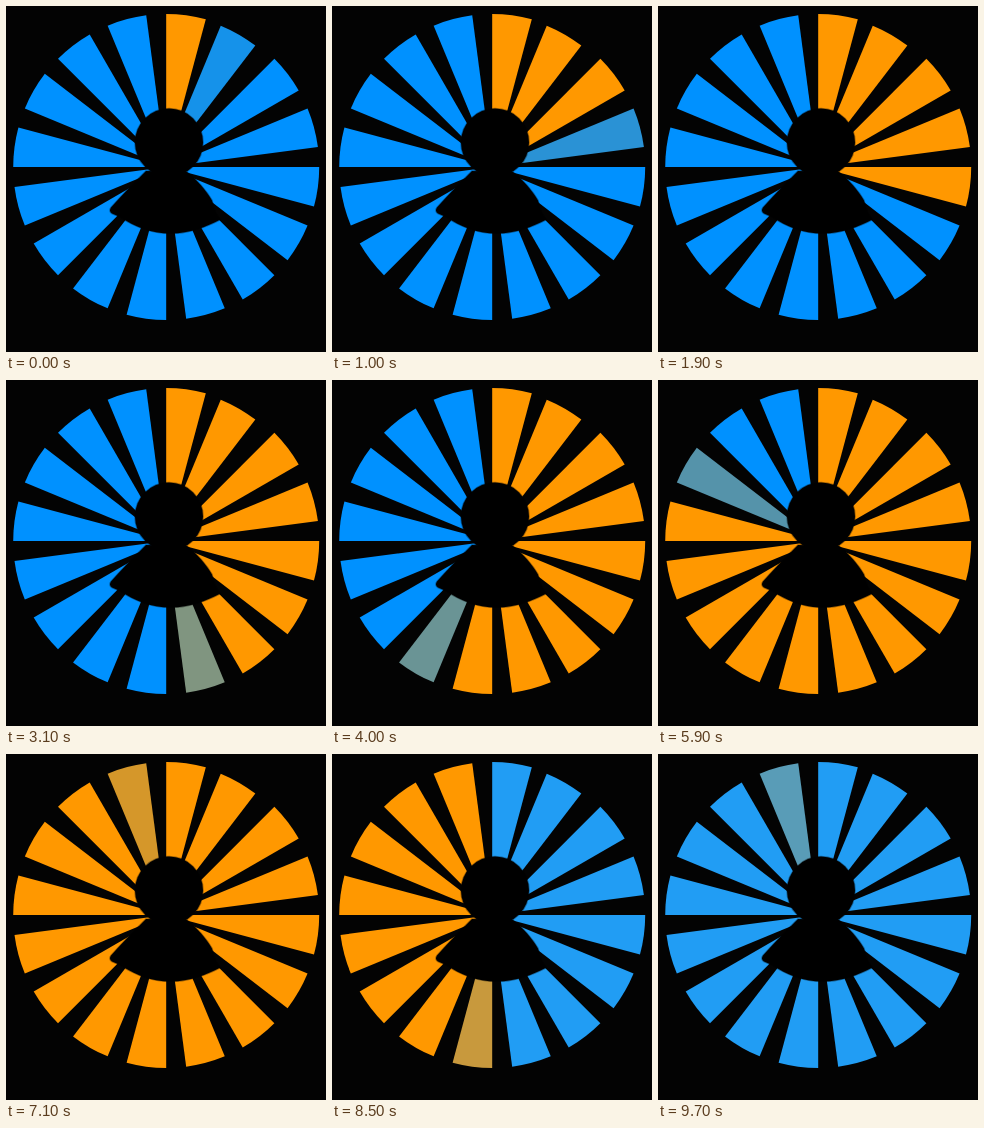
Recreate the animation shown at these times as an HTML page. Size 320 by 346 pixels, loop 9800 ms.

```html
<!DOCTYPE html>
<html lang="en">
<head>
<meta charset="utf-8">
<title>Radial countdown</title>
<style>
html, body { margin: 0; width: 100%; height: 100%; overflow: hidden; background: #030303; }
svg { display: block; width: 100vw; height: 100vh; }
</style>
</head>
<body>
<svg viewBox="0 0 320 346">
  <g id="rays"></g>
  <g stroke="#000" stroke-opacity=".35" stroke-width="1.6">
    <circle cx="163" cy="136.5" r="34"/>
    <path d="M140 165 C131 174 120 185 105 201.5 Q102.5 205 106 207.5 L114 211 C128 220 144 227.500 165 227.500 C184 227.500 200 221 214.500 213.500 Q209 208 206 194.500 C200 184 191 174 181 166 Z"/>
  </g>
</svg>
<script>
const COUNT = 16, LOOP = 9800, STEP = 100;
const CX = 160.2, CY = 161, R = 153;
const BLUE = [0, 145, 255], ORANGE = [255, 152, 0], SKY = [33, 157, 244];
const FILL_TICKS = 12, CLEAR_TICKS = 4, FILL_END = COUNT * FILL_TICKS;

const rays = document.getElementById('rays');

function rim(deg) {
  const a = deg * Math.PI / 180;
  return `${CX + R * Math.sin(a)} ${CY - R * Math.cos(a)}`;
}

const wedges = Array.from({ length: COUNT }, (_, k) => {
  const path = document.createElementNS('http://www.w3.org/2000/svg', 'path');
  const start = k * 360 / COUNT;
  path.setAttribute('d', `M${CX} ${CY}L${rim(start)}A${R} ${R} 0 0 1 ${rim(start + 15)}Z`);
  // the second ray sits a little to the left
  if (k === 1) path.setAttribute('transform', 'translate(-4 0)');
  return rays.appendChild(path);
});

const clamp = v => Math.max(0, Math.min(1, v));

function mix(a, b, p) {
  return `rgb(${a.map((v, i) => Math.round(v + (b[i] - v) * p)).join(',')})`;
}

function draw(ms) {
  const t = Math.floor((ms % LOOP) / STEP) * STEP;
  const tick = Math.round((t + 500) / 40);
  const filling = tick < FILL_END;
  const pos = filling ? tick / FILL_TICKS : (tick - FILL_END) / CLEAR_TICKS;
  const [from, to] = filling ? [BLUE, ORANGE] : [ORANGE, SKY];
  wedges.forEach((w, k) => w.setAttribute('fill', mix(from, to, clamp(pos - k))));
}

let origin;
function loop(now) {
  origin ??= now;
  draw(Math.max(0, now - origin));
  requestAnimationFrame(loop);
}
draw(0);
requestAnimationFrame(loop);
</script>
</body>
</html>
```
